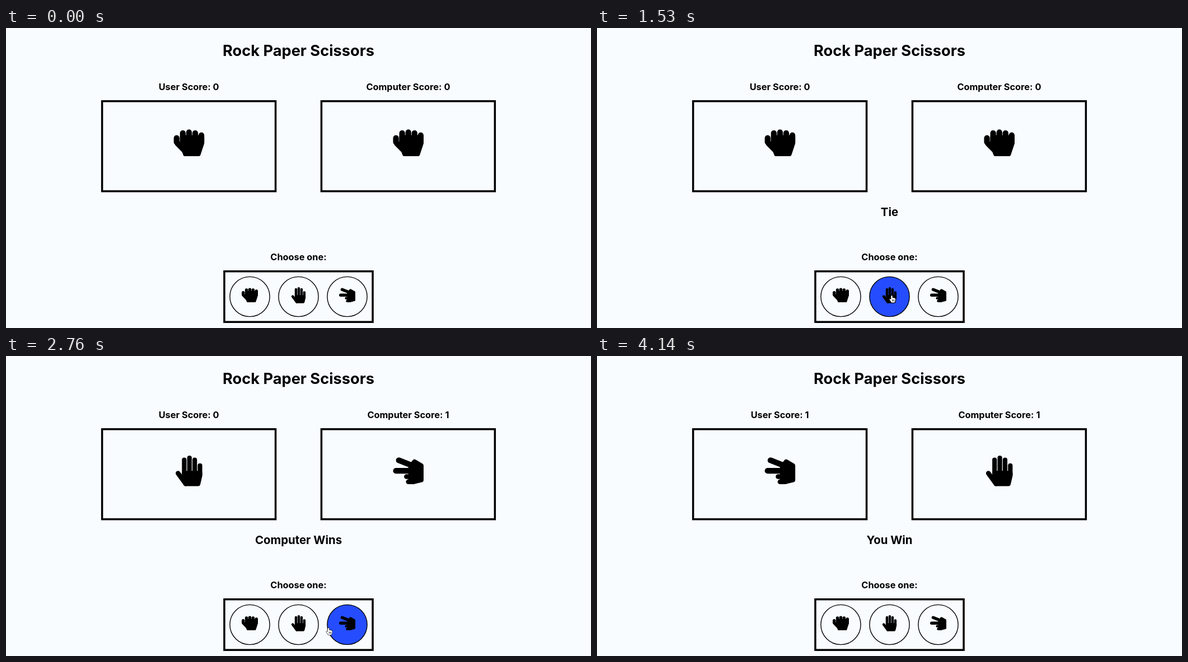
An HTML page with a canvas for the animation above (4170 ms loop, 1045x536 px).

```html
<!DOCTYPE html>
<html lang="en">
<head>
<meta charset="utf-8">
<title>Rock Paper Scissors</title>
<style>
  html, body { margin: 0; width: 100%; height: 100%; overflow: hidden; background: #f8fcff; }
  canvas { display: block; }
</style>
</head>
<body>
<canvas id="stage" width="1045" height="536"></canvas>
<script>
const ctx = document.getElementById('stage').getContext('2d');
const LOOP = 4170, STEP = 30;
const INK = '#000', PAGE = '#f8fcff', BLUE = '#254dff';
const EM = 13.6, MID = 522.5;
const BUTTON_Y = 480, BUTTON_R = 35.6, PITCH = 87;

const names = ['rock', 'paper', 'scissors'];
const buttonX = i => MID + (i - 1) * PITCH;

// Every click plays one round; score and message follow from the two hands.
const clicks = [
  { at: 1200, user: 0, cpu: 0 },
  { at: 1770, user: 1, cpu: 2 },
  { at: 3000, user: 2, cpu: 1 }
];

// The pointer eases from place to place and rests in between.
const entry = { x: 600, y: 200 };
const moves = [
  { at: 30, time: 570, x: MID - PITCH / 2 - 2, y: BUTTON_Y },
  { at: 600, time: 450, x: buttonX(0), y: BUTTON_Y - 3 },
  { at: 1200, time: 330, x: buttonX(1) + 4, y: BUTTON_Y - 2 },
  { at: 2550, time: 330, x: buttonX(2) - 12, y: BUTTON_Y + 9 },
  { at: 3360, time: 360, x: buttonX(2) - 22, y: 545 }
];

const arrow = new Path2D('M0 0V11L2.5 8.6 4.2 12.6 6 11.9 4.3 8H7.8Z');
const pointingHand = new Path2D(
  'M-1.2 .8Q0 -.8 1.2 .8V4Q6 4 6.6 6 7 9 5 12.5H-.5Q-2 10 -4 7-3.6 5.2 -1.2 7Z');

function line(width, x1, y1, x2, y2) {
  ctx.lineWidth = width;
  ctx.beginPath();
  ctx.moveTo(x1, y1);
  ctx.lineTo(x2, y2);
  ctx.stroke();
}

function blob(width, ...points) {
  ctx.lineWidth = width;
  ctx.beginPath();
  points.forEach(([x, y]) => ctx.lineTo(x, y));
  ctx.closePath();
  ctx.fill();
  ctx.stroke();
}

// Hands are drawn on a 512-unit square: round-capped fingers plus a soft palm.
const hands = {
  rock() {
    line(96, 48, 176, 48, 242);
    for (let i = 0; i < 4; i++) {
      const x = 152 + 104 * i;
      line(96, x, 80 + 12 * (i - 1) ** 2, x, 240);
    }
    blob(48, [128, 152], [488, 152], [488, 262], [424, 456],
      [184, 456], [160, 396], [44, 280], [72, 256], [128, 256]);
  },
  paper() {
    ctx.translate(32, 0);
    line(80, 40, 296, 168, 472);
    for (let i = 0; i < 4; i++) {
      const x = 144 + 88 * i;
      line(77, x, 40 + 32 * (i - 1) ** 2, x, 300);
    }
    blob(80, [144, 296], [408, 296], [408, 330], [375, 472], [168, 472]);
  },
  scissors() {
    line(96, 96, 79, 286, 154);
    line(96, 48, 256, 320, 256);
    for (let i = 0; i < 2; i++) line(80, 224 + 32 * i, 352 + 88 * i, 340, 352 + 88 * i);
    blob(80, [296, 184], [360, 104], [472, 168], [472, 408], [336, 440], [296, 440]);
  }
};

function drawHand(choice, x, y, size) {
  ctx.save();
  ctx.translate(x - size / 2, y - size / 2);
  ctx.scale(size / 512, size / 512);
  ctx.fillStyle = ctx.strokeStyle = INK;
  ctx.lineCap = ctx.lineJoin = 'round';
  hands[names[choice]]();
  ctx.restore();
}

function label(text, x, baseline, size) {
  ctx.font = `700 ${size * EM}px Inter, sans-serif`;
  ctx.textAlign = 'center';
  ctx.fillStyle = INK;
  ctx.fillText(text, x, baseline);
}

function frame(x, y, w, h) {
  ctx.strokeStyle = INK;
  ctx.lineWidth = 3.5;
  ctx.strokeRect(x + 1.75, y + 1.75, w - 3.5, h - 3.5);
}

function player(title, choice, side) {
  const x = MID + side * 195.9;
  label(title, x, 111, 1.2);
  frame(x - 156.7, 129, 313.4, 164.4);
  drawHand(choice, x + 0.3, 205.2, 54.5);
}

function gameAt(t) {
  const game = { user: 0, cpu: 0, wins: 0, losses: 0, text: '' };
  for (const { at, user, cpu } of clicks) {
    if (at > t) break;
    const result = (user - cpu + 3) % 3;
    game.user = user;
    game.cpu = cpu;
    if (result === 1) game.wins++;
    if (result === 2) game.losses++;
    game.text = ['Tie', 'You Win', 'Computer Wins'][result];
  }
  return game;
}

function pointerAt(t) {
  const last = moves[moves.length - 1];
  if (t < moves[0].at || t >= last.at + last.time) return null;
  let { x, y } = entry;
  for (const move of moves) {
    const u = Math.min(1, Math.max(0, (t - move.at) / move.time));
    const ease = u * u * (3 - 2 * u);
    x += (move.x - x) * ease;
    y += (move.y - y) * ease;
  }
  return { x, y };
}

function drawPointer({ x, y }, hovering) {
  const shape = hovering ? pointingHand : arrow;
  ctx.save();
  ctx.translate(x, y);
  ctx.lineJoin = 'round';
  ctx.lineWidth = 1.2;
  ctx.fillStyle = hovering ? '#fff' : INK;
  ctx.strokeStyle = hovering ? INK : '#fff';
  ctx.stroke(shape);
  ctx.fill(shape);
  if (hovering) {
    for (let i = 0; i < 3; i++) line(0.7, 1 + 1.7 * i, 7, 1 + 1.7 * i, 10.5);
  }
  ctx.restore();
}

function drawButton(i, hovering) {
  ctx.beginPath();
  ctx.arc(buttonX(i), BUTTON_Y, BUTTON_R, 0, Math.PI * 2);
  ctx.fillStyle = hovering ? BLUE : PAGE;
  ctx.fill();
  ctx.strokeStyle = INK;
  ctx.lineWidth = 1.4;
  ctx.stroke();
  drawHand(i, buttonX(i), 477.3, 29);
}

function draw(t) {
  const game = gameAt(t);
  const pointer = pointerAt(t);
  const hovered = pointer
    ? names.findIndex((_, i) => Math.hypot(pointer.x - buttonX(i), pointer.y - BUTTON_Y) < BUTTON_R)
    : -1;

  ctx.fillStyle = PAGE;
  ctx.fillRect(0, 0, 1045, 536);
  label('Rock Paper Scissors', MID, 50.2, 2);
  player(`User Score: ${game.wins}`, game.user, -1);
  player(`Computer Score: ${game.losses}`, game.cpu, 1);
  label(game.text, MID, 336.4, 1.5);
  label('Choose one:', MID, 414.6, 1.2);
  frame(388.2, 433, 268.6, 94);
  names.forEach((_, i) => drawButton(i, i === hovered));
  if (pointer) drawPointer(pointer, hovered >= 0);
}

const start = performance.now();
function tick() {
  const t = (performance.now() - start) % LOOP;
  draw(Math.floor(t / STEP) * STEP);
  requestAnimationFrame(tick);
}
tick();
</script>
</body>
</html>
```
